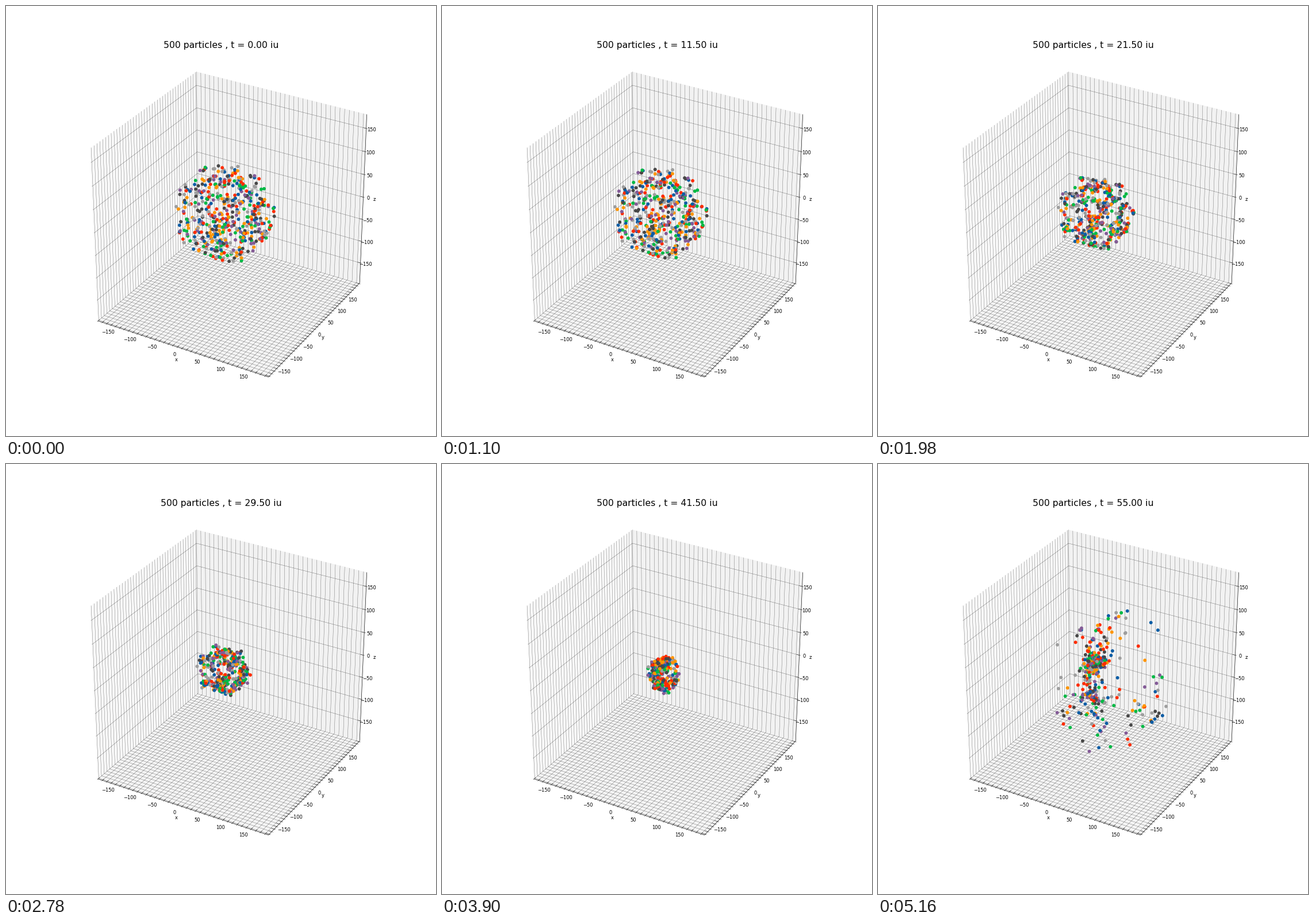
Animation of 748x748 px, one loop 5.26 s. Source, as a matplotlib script:

```python
import numpy as np
import matplotlib.pyplot as plt
from matplotlib.animation import FuncAnimation
from matplotlib.collections import LineCollection, PolyCollection

SIZE, DPI = 748, 100
PT = 72 / DPI                     # points per pixel
LOOP_MS, TICK_MS = 5260, 20
LAST_STEP, DT = 110, 0.5

# ---------- camera ----------
ELEV, AZIM = np.radians(30), np.radians(-60)
EYE = np.array([np.cos(ELEV) * np.cos(AZIM), np.cos(ELEV) * np.sin(AZIM), np.sin(ELEV)])
RIGHT = np.array([-np.sin(AZIM), np.cos(AZIM), 0])
UP = np.cross(EYE, RIGHT)
HALF, DIST, ZOOM = 0.55, 10, 1712
MID = np.array([391.4, 369.9])

# data value -> box coordinate in [-1, 1]
OFFSET = np.array([-0.0435, -0.025, 0.0449])
SLOPE = np.array([0.0053, 0.00505, 0.00531])


def project(points):
    p = np.asarray(points, float)
    k = ZOOM / (DIST - HALF * (p @ EYE))
    return np.stack([MID[0] + k * (p @ RIGHT), MID[1] - k * (p @ UP)], axis=-1)


def box(axis, value):
    return OFFSET[axis] + SLOPE[axis] * value


def inside(axis, step):
    values = np.arange(-250, 251, step)
    return [s for s in box(axis, values) if abs(s) <= 1]


fig = plt.figure(figsize=(SIZE / DPI, SIZE / DPI), dpi=DPI, facecolor="white")
ax = fig.add_axes([0, 0, 1, 1])
ax.set_xlim(0, SIZE)
ax.set_ylim(SIZE, 0)
ax.axis("off")


def label(xy, text, px=8.33, va="center"):
    return ax.text(*xy, text, ha="center", va=va, fontsize=px * PT,
                   family="DejaVu Sans", color="black", zorder=5)


def strokes(paths, px, z, alpha=1):
    ax.add_collection(LineCollection([project(p) for p in paths], colors="black",
                                     linewidths=px * PT, alpha=alpha, zorder=z),
                      autolim=False)


def draw_box():
    panes = [
        [(-1, -1, -1), (-1, 1, -1), (-1, 1, 1), (-1, -1, 1)],
        [(-1, 1, -1), (1, 1, -1), (1, 1, 1), (-1, 1, 1)],
        [(-1, -1, -1), (1, -1, -1), (1, 1, -1), (-1, 1, -1)],
    ]
    ax.add_collection(PolyCollection([project(p) for p in panes], linewidths=0,
                                     facecolors=["#f9f9f9", "#f2f2f2", "#f5f5f5"],
                                     zorder=0), autolim=False)

    xs, ys, zs = inside(0, 10), inside(1, 10), box(2, np.arange(-150, 151, 50))
    grid = [[(s, -1, -1), (s, 1, -1), (s, 1, 1)] for s in xs]
    grid += [[(1, s, -1), (-1, s, -1), (-1, s, 1)] for s in ys]
    grid += [[(-1, -1, s), (-1, 1, s), (1, 1, s)] for s in zs]
    strokes(grid, 0.42, 1, alpha=0.6)

    strokes([[(-1, -1, -1), (1, -1, -1)], [(1, -1, -1), (1, 1, -1)],
             [(1, 1, -1), (1, 1, 1)]], 0.65, 2)

    out, back = 1.016, 0.968
    ticks = [[(s, -out, -1), (s, -back, -1)] for s in xs]
    ticks += [[(out, s, -1), (back, s, -1)] for s in ys]
    ticks += [[(out, 1, s), (back, 1, s)] for s in zs]
    strokes(ticks, 0.45, 2)

    for v in range(-150, 151, 50):
        text = str(v).replace("-", "\u2212")
        label(project((box(0, v), -1.056, -1.056)), text)
        label(project((1.053, box(1, v), -1.053)), text)
        label(project((1.059, 1, box(2, v))), text)
    label((296.5, 615.5), "x")
    label((551.5, 576.5), "y")
    label((640.5, 336.5), "z")


# ---------- gravitational collapse of a cold sphere ----------
COUNT, RADIUS = 500, 98
FALL_TIME, SOFTENING, SUBSTEPS = 34.5, 3, 4
MASS = np.pi ** 2 * RADIUS ** 3 / (8 * FALL_TIME ** 2) / COUNT   # G * m per particle
CYCLE = ["#0C5DA5", "#00B945", "#FF9500", "#FF2C00", "#845B97", "#474747", "#9e9e9e"]


def ball(rng):
    p = rng.normal(size=(COUNT, 3))
    p /= np.linalg.norm(p, axis=1, keepdims=True)
    p *= RADIUS * rng.random((COUNT, 1)) ** (1 / 3)
    return p - p.mean(axis=0)


def gravity(p):
    sq = (p * p).sum(axis=1)
    d2 = sq[:, None] + sq - 2 * p @ p.T + SOFTENING ** 2
    pull = MASS / (d2 * np.sqrt(d2))
    return pull @ p - pull.sum(axis=1, keepdims=True) * p


def simulate(p):
    h = DT / SUBSTEPS
    v, a = np.zeros_like(p), gravity(p)
    path = [p]
    for _ in range(LAST_STEP):
        for _ in range(SUBSTEPS):
            v = v + a * h / 2
            p = p + v * h
            a = gravity(p)
            v = v + a * h / 2
        path.append(p)
    return np.array(path)


path = OFFSET + SLOPE * simulate(ball(np.random.default_rng(12)))
colors = np.array(CYCLE)[np.arange(COUNT) % len(CYCLE)]


def step_at(tick):
    # steps last 20, 20 and 100 ms in turn
    cycle, rest = divmod(tick * TICK_MS + 20, 140)
    return min(3 * cycle - 1 + min(rest // 20, 2), LAST_STEP)


draw_box()
title = label((374.5, 72.7), "", 15.62, "baseline")
dots = ax.scatter(np.zeros(COUNT), np.zeros(COUNT), s=(5.9 * PT) ** 2,
                  c=colors, linewidths=0, zorder=3)


def update(tick):
    step = step_at(tick)
    order = np.argsort(path[step] @ EYE)
    dots.set_offsets(project(path[step][order]))
    dots.set_facecolors(colors[order])
    title.set_text(f"500 particles , t = {step * DT:.2f} iu")
    return dots, title


update(0)
anim = FuncAnimation(fig, update, frames=LOOP_MS // TICK_MS, interval=TICK_MS,
                     repeat=True, repeat_delay=0, blit=False)
plt.show()
```
